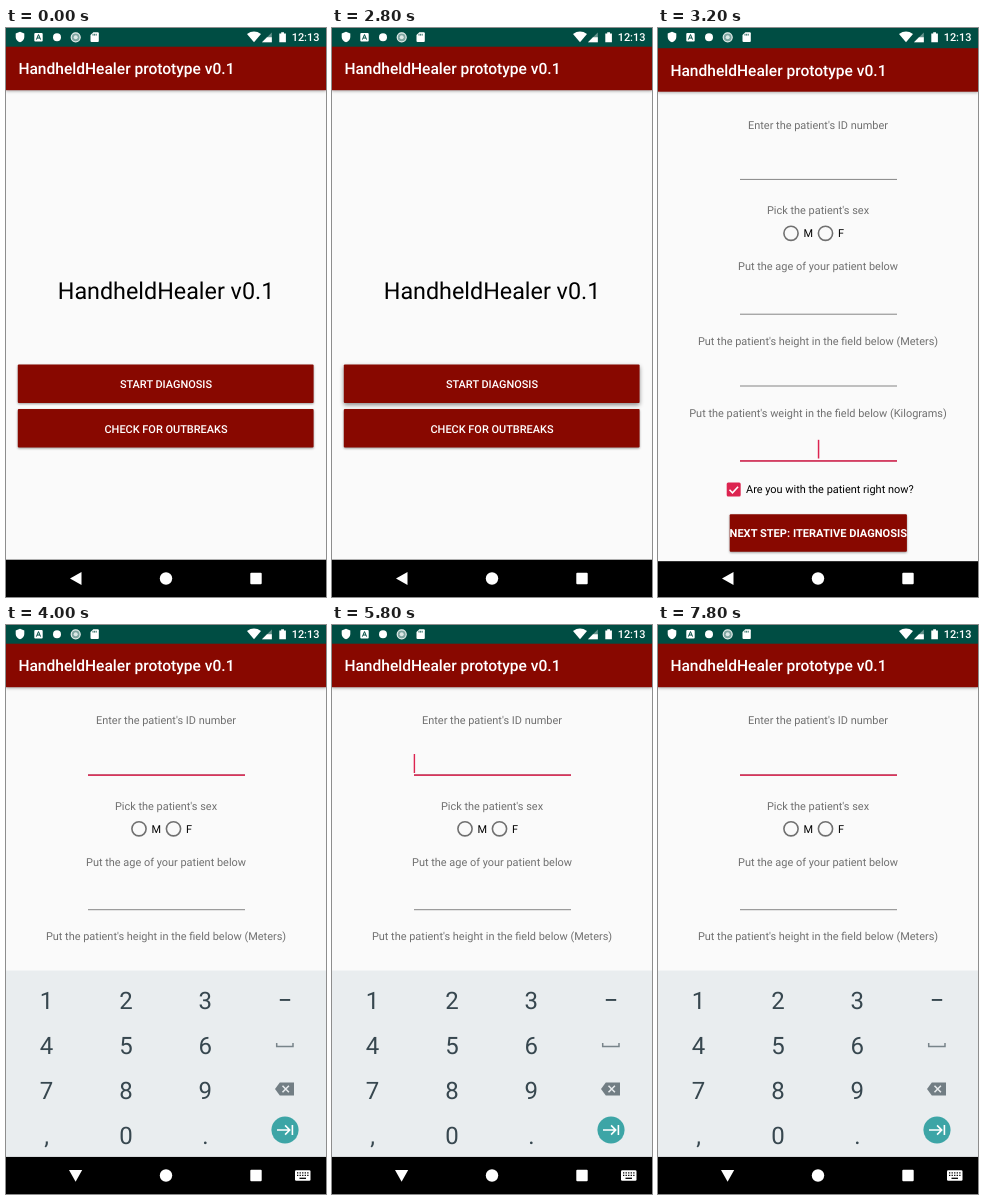
Animation, 320 px wide and 569 px high, one loop 8 s. Source, as an HTML page:

```html
<!DOCTYPE html>
<html lang="en">
<head>
<meta charset="utf-8">
<title>HandheldHealer prototype</title>
<style>
  html, body { margin: 0; width: 100%; height: 100%; overflow: hidden; background: #fafafa; }
  svg { display: block; width: 100vw; height: 100vh; }
  text { font: 10.95px Roboto, sans-serif; text-rendering: geometricPrecision; }
  .medium { font-weight: 500; }
  .bold { font-size: 11.08px; font-weight: 700; }
  .mid { text-anchor: middle; }
  .label { fill: #707070; text-anchor: middle; }
  .brand { fill: #880800; }
  .accent { fill: #dc2450; }
  .line { fill: #868686; }
  .white { fill: #fff; }
  .bar { filter: drop-shadow(0 1.5px 1.5px rgba(0, 0, 0, .32)); }
  .button { filter: drop-shadow(0 1px 1px rgba(0, 0, 0, .38)); }
  .title { font-size: 15.56px; font-weight: 500; fill: #fff; }
  .hero { font-size: 23.33px; }
  .keys text { font-size: 24px; fill: #37474f; text-anchor: middle; }

  .home, .press, .form, .weight, .ident, .caret, .keyboard, .back {
    animation: 8s step-end infinite;
  }
  .home { animation-name: home; }
  .press { animation-name: press; }
  .form { animation-name: form; }
  .weight { animation-name: weight; }
  .ident { animation-name: ident; }
  .caret { animation-name: blink; }
  .keyboard { animation-name: keyboard; }
  .back { animation-name: back; }

  @keyframes home { 0% { visibility: visible } 40%, 100% { visibility: hidden } }
  @keyframes press {
    0% { filter: drop-shadow(0 1px 1px rgba(0, 0, 0, .38)) }
    35%, 100% { filter: drop-shadow(0 2px 2px rgba(0, 0, 0, .45)) }
  }
  @keyframes form {
    0% { visibility: hidden; transform: none }
    40% { visibility: visible; transform: translateY(1.5px) }
    42.5%, 100% { visibility: visible; transform: none }
  }
  @keyframes weight {
    0%, 42.5%, 100% { visibility: hidden }
    40% { visibility: visible }
  }
  @keyframes ident { 0% { visibility: hidden } 42.5%, 100% { visibility: visible } }
  @keyframes blink {
    0%, 50%, 62.5%, 75%, 85%, 97.5%, 100% { visibility: hidden }
    42.5%, 55%, 67.5%, 80%, 92.5% { visibility: visible }
  }
  @keyframes keyboard { 0% { visibility: hidden } 45%, 100% { visibility: visible } }
  @keyframes back { 0% { visibility: visible } 45%, 100% { visibility: hidden } }
</style>
</head>
<body>
<svg viewBox="0 0 320 569" preserveAspectRatio="none">
  <defs>
    <!-- Window background with its system bars and app bar -->
    <g id="window">
      <rect width="320" height="569" fill="#fafafa"/>
      <rect class="brand bar" y="10" width="320" height="52.2"/>
      <text class="title" x="12.4" y="46.4">HandheldHealer prototype v0.1</text>
      <rect width="320" height="18.7" fill="#004d43"/>
      <rect y="531.7" width="320" height="37.3"/>
    </g>
  </defs>
  <use href="#window"/>

  <g class="home">
    <text class="hero mid" x="160" y="270.5">HandheldHealer v0.1</text>
    <rect class="brand press" x="11.8" y="336.5" width="295.8" height="38.5" rx="1"/>
    <text class="medium white mid" x="160" y="360.3">START DIAGNOSIS</text>
    <rect class="brand button" x="11.8" y="381" width="295.8" height="38.5" rx="1"/>
    <text class="medium white mid" x="160" y="404.7">CHECK FOR OUTBREAKS</text>
  </g>

  <g class="form">
    <use href="#window"/>
    <g class="fields"></g>
    <g fill="none" stroke="#707070" stroke-width="1.6">
      <circle cx="133" cy="203.8" r="7.1"/>
      <circle cx="167.5" cy="203.8" r="7.1"/>
    </g>
    <text x="145.5" y="207.7">M</text>
    <text x="180" y="207.7">F</text>
    <g class="weight accent">
      <rect x="82" y="430.7" width="157" height="1.5"/>
      <rect x="159.8" y="410.3" width="1.5" height="18.7"/>
    </g>
    <g class="ident accent">
      <rect x="82" y="149.4" width="157" height="1.5"/>
      <rect class="caret" x="81.7" y="129" width="1.4" height="19"/>
    </g>
    <rect class="accent" x="68.7" y="453" width="14" height="14" rx="1.5"/>
    <path d="M71.5 460.3l3 3 5.6-6" fill="none" stroke="#fff" stroke-width="1.6"/>
    <text x="88" y="463.9">Are you with the patient right now?</text>
    <rect class="brand button" x="71.7" y="484.7" width="177.2" height="37.5" rx="1"/>
    <text class="bold white mid" x="160.3" y="507.8">NEXT STEP: ITERATIVE DIAGNOSIS</text>
  </g>

  <g class="keyboard">
    <rect y="345.5" width="320" height="186.2" fill="#e9edef"/>
    <g class="keys"></g>
    <rect x="273.8" y="374" width="10.4" height="1.9" fill="#37474f"/>
    <path d="M270.7 418v3.6h16.3v-3.6" fill="none" stroke="#78848a" stroke-width="1.5"/>
    <path d="M269 464l4.8-6.5h14.2v13h-14.2z" fill="#727e84"/>
    <path d="M276.5 460.8l6.4 6.4m0-6.4l-6.4 6.4" stroke="#e9edef" stroke-width="1.5"/>
    <circle cx="279" cy="505" r="13.6" fill="#3da5a6"/>
    <path d="M271 505h12.5m-4.4-4.6l4.6 4.6-4.6 4.6M286.4 500v10" fill="none" stroke="#fff" stroke-width="1.6"/>
  </g>

  <g class="status">
    <g class="white">
      <path d="M14 3.8l4.3 1.8v3.3c0 2.6-1.8 4.5-4.3 5.4-2.5-.9-4.3-2.8-4.3-5.4V5.6z"/>
      <rect x="28.3" y="5" width="8.4" height="8.4" rx="1"/>
      <circle cx="51" cy="9.2" r="4"/>
      <path d="M87.3 4.3h4.5q1 0 1 1v7.6q0 1-1 1h-6.3q-1 0-1-1v-5.8z"/>
      <path d="M248 14.3l-7-8.4q7-4.6 14 0z"/>
      <path d="M265.8 4.5v9.8h-9.8z" opacity=".4"/>
      <path d="M265.8 9.3v5h-9.8l5-5z"/>
      <path d="M273.3 5.4h1.9v-1.2h2.8v1.2h1.9v8.9h-6.6z"/>
      <text class="medium" x="285.7" y="13.4">12:13</text>
    </g>
    <circle cx="69.7" cy="9.3" r="4.5" fill="#7fa6a1" stroke="#e5eeec" stroke-width="1.2"/>
    <circle cx="69.7" cy="9.3" r="2" fill="#dce8e6"/>
    <path d="M30.4 11.6l2.1-5 2.1 5m-3.5-1.6h2.8" fill="none" stroke="#004d43"/>
    <path d="M87 5.8v1.8m1.6-1.8v1.8m1.6-1.8v1.8" stroke="#004d43" stroke-width=".8"/>
  </g>

  <g class="white">
    <path class="back" d="M64 550.5l11.5-6.5v13z"/>
    <circle cx="160" cy="550.5" r="6.2"/>
    <rect x="244.3" y="544.8" width="11.4" height="11.4" rx="1"/>
    <g class="keyboard">
      <path d="M63 545h13.2l-6.6 11.8z"/>
      <rect x="289" y="545.2" width="15.5" height="10.6" rx="1.2"/>
      <path d="M291 547.8h11.6m-11.6 2.6h11.6" stroke="#000" stroke-width="1.3" stroke-dasharray="1.3 1.25"/>
      <path d="M293.5 553.3h6.5" stroke="#000" stroke-width="1.3"/>
    </g>
  </g>
</svg>
<script>
  const svgNode = (parent, tag, attrs, text = "") => {
    const node = document.createElementNS("http://www.w3.org/2000/svg", tag);
    for (const [key, value] of Object.entries(attrs)) node.setAttribute(key, value);
    node.textContent = text;
    parent.append(node);
  };

  // Label, its baseline and the position of the underline, if any.
  const fields = document.querySelector(".fields");
  [
    ["Enter the patient's ID number", 99.2, 149.4],
    ["Pick the patient's sex", 184.5],
    ["Put the age of your patient below", 240.5, 284.2],
    ["Put the patient's height in the field below (Meters)", 315.3, 356],
    ["Put the patient's weight in the field below (Kilograms)", 387.3, 430.9],
  ].forEach(([text, y, line]) => {
    svgNode(fields, "text", { class: "label", x: 160, y }, text);
    if (line) svgNode(fields, "rect", { class: "line", x: 82, y: line, width: 157, height: 1 });
  });

  const keys = document.querySelector(".keys");
  [..."123456789,0."].forEach((key, i) =>
    svgNode(keys, "text", { x: 40.5 + (i % 3) * 79.4, y: 383.5 + Math.floor(i / 3) * 45 }, key));
</script>
</body>
</html>
```
